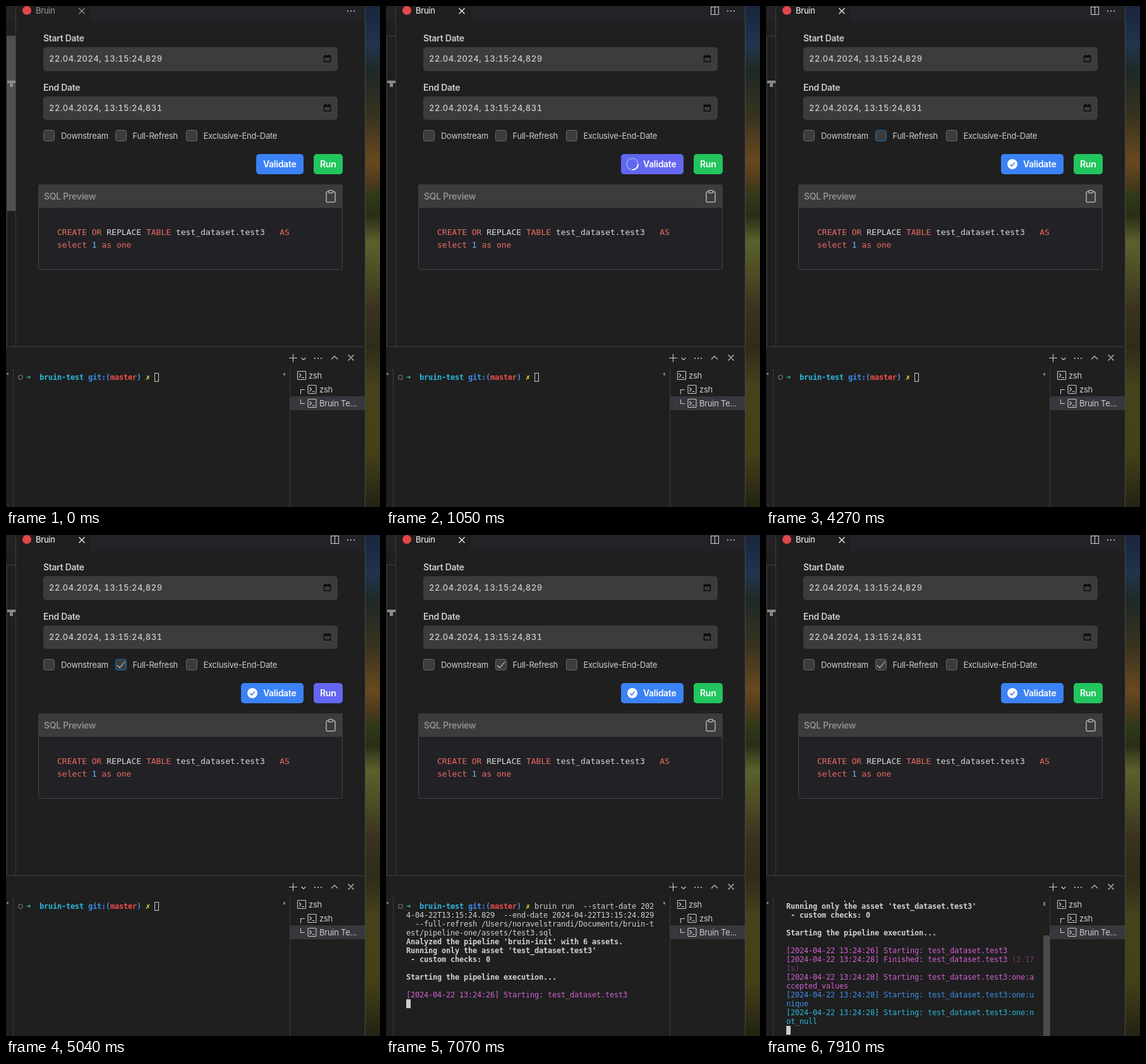
These frames come from a looping animation (592x792 px, 8000 ms). An HTML page:

```html
<!DOCTYPE html>
<html lang="en">
<head>
<meta charset="utf-8">
<title>Pipeline run</title>
<style>
  html, body { margin: 0; width: 100%; height: 100%; overflow: hidden; background: #1f1f1f; }
  svg { display: block; }
  text { white-space: pre; fill: #ccc; }
  .ui { font: 13px Inter, sans-serif; letter-spacing: -.02em; }
  .label { font: 600 14px Inter, sans-serif; letter-spacing: -.02em; }
  .date { font: 500 13px Inter, sans-serif; letter-spacing: .5px; font-feature-settings: "tnum"; }
  .sql { font: 13px "DejaVu Sans Mono", monospace; }
  .term text { font: 12px "DejaVu Sans Mono", monospace; letter-spacing: -.225px; }
  .term .bold { font-weight: 700; }
  .white { fill: #fff; }
  .red { fill: #ee6a60; }
  .icon { fill: none; stroke: #ccc; stroke-width: 1.1; }
  .line { fill: none; stroke: #3d3d3d; }
  .box { fill: #3c3c3c; stroke: #6b6b6b; }
</style>
</head>
<body>
<svg width="592" height="792" viewBox="0 0 592 792">
  <defs>
    <linearGradient id="hill" x2="0" y2="1">
      <stop offset="0" stop-color="#19263e"/>
      <stop offset=".08" stop-color="#22344c"/>
      <stop offset=".13" stop-color="#1e2926"/>
      <stop offset=".22" stop-color="#38331f"/>
      <stop offset=".31" stop-color="#68491f"/>
      <stop offset=".36" stop-color="#46381b"/>
      <stop offset=".38" stop-color="#2d3a19"/>
      <stop offset=".42" stop-color="#2b2d17"/>
      <stop offset=".47" stop-color="#5c602c"/>
      <stop offset=".54" stop-color="#4b4b24"/>
      <stop offset=".6" stop-color="#3b3320"/>
      <stop offset=".68" stop-color="#2f2b1a"/>
      <stop offset=".76" stop-color="#46421b"/>
      <stop offset=".89" stop-color="#444017"/>
      <stop offset="1" stop-color="#232214"/>
    </linearGradient>
    <clipPath id="screen"><rect y="578" width="448" height="214"/></clipPath>
    <g id="shell" class="icon">
      <rect x=".5" y=".5" width="13" height="13" rx="1"/>
      <path d="M3 4l3 3-3 3M7 10.5h4"/>
    </g>
    <g id="calendar"><path d="M1 2h10v9H1z" fill="none" stroke="#0b0b0b" stroke-width="1.4"/><path d="M1 1.5h10v3H1zM2.5 0h1.5v2H2.5zM8 0h1.5v2H8z" fill="#0b0b0b"/></g>
  </defs>

  <rect x="569" width="23" height="792" fill="url(#hill)"/>
  <path d="M568.5 0V792" stroke="#484848"/>

  <!-- editor tabs and left gutter -->
  <path d="M0 0H15V25H0zM134 0H568V25H134z" fill="#232327"/>
  <path class="line" d="M15.5 0V538M1.5 47V538M0 47.5H15M0 538.5H568"/>
  <rect id="scrollbar" x="1" y="47" width="14" height="277" fill="#4f4f4f"/>
  <path d="M2 118H15V122H11V128H6V122H2z" fill="#8a8a8a"/>
  <circle cx="33" cy="7" r="7" fill="#e2474b"/>
  <text id="tab" class="ui" x="47" y="12" font-style="italic">Bruin</text>
  <path id="close" class="icon" d="M115.500 3.500l9 9m0-9l-9 9"/>
  <path id="split" class="icon" d="M514.500 1.500h12v12h-12zM520.500 1.500v12"/>
  <g fill="#ccc"><circle cx="541" cy="8" r="1.100"/><circle cx="546" cy="8" r="1.100"/><circle cx="551" cy="8" r="1.100"/></g>

  <!-- form -->
  <text class="label" x="59" y="56">Start Date</text>
  <text class="label" x="59" y="134">End Date</text>
  <rect x="59" y="65" width="466" height="38" rx="5" fill="#3c3c3c"/>
  <rect x="59" y="143" width="466" height="37" rx="5" fill="#3c3c3c"/>
  <text class="date" x="68" y="88">22.04.2024, 13:15:24,829</text>
  <text class="date" x="68" y="166">22.04.2024, 13:15:24,831</text>
  <use href="#calendar" x="502.500" y="77"/>
  <use href="#calendar" x="502.500" y="155"/>
  <rect class="box" x="59.500" y="196.500" width="17" height="17" rx="3"/>
  <rect class="box" x="173.500" y="196.500" width="17" height="17" rx="3" id="refresh"/>
  <rect class="box" x="285.500" y="196.500" width="17" height="17" rx="3"/>
  <path id="tick" class="icon" d="M176 206l4 4 8.500-10"/>
  <text class="ui" x="87" y="210">Downstream</text>
  <text class="ui" x="200.500" y="210">Full-Refresh</text>
  <text class="ui" x="312.500" y="210">Exclusive-End-Date</text>

  <rect id="validate" y="234" height="32" rx="5"/>
  <g id="spinner" fill="none" stroke-width="2">
    <circle cx="390" cy="250" r="9" stroke="#79a9ee"/>
    <path d="M399 250a9 9 0 0 1-9 9" stroke="#fff"/>
  </g>
  <g id="done">
    <circle cx="390" cy="250" r="8" fill="#fff"/>
    <path d="M386.500 250.500l2.500 2.500 4.500-5.500" fill="none" stroke="#3b82f6" stroke-width="1.700"/>
  </g>
  <text class="label white" x="407" y="255">Validate</text>
  <rect id="run" x="487" y="234" width="46" height="32" rx="5"/>
  <text class="label white" x="497" y="255">Run</text>

  <!-- SQL card -->
  <rect x="51.500" y="282.500" width="481" height="134" rx="3" fill="#222226" stroke="#444"/>
  <path d="M51 319V285q0-3 3-3H530q3 0 3 3V319z" fill="#3c3c3c"/>
  <text class="label" x="60" y="306" style="fill:#8f8f8f">SQL Preview</text>
  <g class="icon" style="stroke:#b0b0b0;stroke-width:1.500"><rect x="507" y="293.500" width="14" height="16.500" rx="2"/><rect x="510.500" y="291.500" width="7" height="4" rx="1.500" fill="#3c3c3c"/></g>
  <text class="sql red" x="81" y="362">CREATE OR <tspan fill="#ddd">REPLACE</tspan> TABLE <tspan fill="#ddd">test_dataset.test3</tspan>   AS</text>
  <text class="sql red" x="81" y="382">select <tspan fill="#6cb6ff">1</tspan> as one</text>

  <!-- terminal panel -->
  <path class="icon" d="M448 556.500h13M454.500 550v13M467.500 556l3.500 3.500 3.500-3.500M515 558.500l5-5 5 5M541.500 551.500l9 9m0-9l-9 9"/>
  <g fill="#ccc"><circle cx="489" cy="557" r="1.100"/><circle cx="494" cy="557" r="1.100"/><circle cx="499" cy="557" r="1.100"/></g>
  <path class="line" d="M11.500 573V792M449.500 573V792"/>
  <rect x="450" y="617" width="118" height="22" fill="#37373d"/>
  <path class="icon" d="M473 606.500h-6.500v7M466.500 622v6.500h6.500"/>
  <use href="#shell" x="461" y="577"/>
  <use href="#shell" x="477.500" y="599"/>
  <use href="#shell" x="477.500" y="621"/>
  <text class="ui" x="479" y="589">zsh</text>
  <text class="ui" x="496" y="611">zsh</text>
  <text class="ui" x="496" y="633">Bruin Te...</text>
  <rect x="1" y="580" width="3" height="3" fill="#777"/>
  <rect id="mark" x="439" y="580" width="3" height="4" fill="#777"/>
  <rect id="slider" x="439" y="633" width="10" height="159" fill="#4b4b4b"/>
  <g clip-path="url(#screen)">
    <g id="term" class="term">
      <rect id="select1" x="277" y="580" height="14" fill="#264f78"/>
      <rect id="select2" x="32" y="594" height="14" fill="#264f78"/>
      <circle cx="23" cy="587" r="3.300" fill="none" stroke="#6b6b6b" stroke-width="1.300"/>
      <rect id="cursor" x="32.500" width="6" height="13" stroke="#ccc"/>
    </g>
  </g>
</svg>
<script>
const $ = id => document.getElementById(id);
const set = (id, attrs) => { for (const k in attrs) $(id).setAttribute(k, attrs[k]); };
const show = (id, on) => set(id, { visibility: on ? 'visible' : 'hidden' });

const LOOP = 8000, CELL = 7, ROW = 14;
const BLUE = '#3b82f6', INDIGO = '#6366f1', GREEN = '#22c55e';
const white = '#d0d0d0', pink = '#d161d1', sky = '#3b8eea', cyan = '#29b8db';

// time shown, row, column, text, colour, bold
const output = [
  [0, 0, 0, '➜', '#23d18b', 1],
  [0, 0, 3, 'bruin-test', cyan, 1],
  [0, 0, 14, 'git:(', sky, 1],
  [0, 0, 19, 'master', '#f14c4c', 1],
  [0, 0, 25, ')', sky, 1],
  [0, 0, 27, '✗', '#f5f543', 1],
  [5460, 0, 29, 'bruin run  --start-date 202', white],
  [5460, 1, 0, '4-04-22T13:15:24.829  --end-date 2024-04-22T13:15:24.829', white],
  [5460, 2, 0, '  --full-refresh /Users/noravelstrandi/Documents/bruin-t', white],
  [5460, 3, 0, 'est/pipeline-one/assets/test3.sql', white],
  [5530, 4, 0, "Analyzed the pipeline 'bruin-init' with 6 assets.", white, 1],
  [5530, 5, 0, "Running only the asset 'test_dataset.test3'", white, 1],
  [5530, 6, 0, ' - custom checks: 0', white, 1],
  [5530, 8, 0, 'Starting the pipeline execution...', white, 1],
  [5600, 10, 0, '[2024-04-22 13:24:26] Starting: test_dataset.test3', pink],
  [7840, 11, 0, '[2024-04-22 13:24:28] Finished: test_dataset.test3', pink],
  [7840, 11, 51, '(2.17', '#733773'],
  [7840, 12, 0, '1s)', '#733773'],
  [7840, 13, 0, '[2024-04-22 13:24:28] Starting: test_dataset.test3:one:a', pink],
  [7840, 14, 0, 'ccepted_values', pink],
  [7840, 15, 0, '[2024-04-22 13:24:28] Starting: test_dataset.test3:one:u', sky],
  [7840, 16, 0, 'nique', sky],
  [7840, 17, 0, '[2024-04-22 13:24:28] Starting: test_dataset.test3:one:n', cyan],
  [7840, 18, 0, 'ot_null', cyan],
].map(([time, row, col, text, colour, bold]) => {
  const node = document.createElementNS('http://www.w3.org/2000/svg', 'text');
  node.setAttribute('x', 32 + col * CELL);
  node.setAttribute('y', 591 + row * ROW);
  node.style.fill = colour;
  if (bold) node.classList.add('bold');
  node.textContent = text;
  $('term').append(node);
  return { time, node };
});

function drawEditor(t) {
  const focused = t >= 630, wide = t >= 700, valid = t >= 1470;
  const fade = Math.min(4, Math.max(0, Math.floor(t / 70)));
  set('scrollbar', { opacity: t >= 490 ? 0 : 1 - fade * .18 });
  $('tab').style.fill = focused ? '#fff' : '#9d9d9d';
  $('close').style.stroke = focused ? '#fff' : '#9d9d9d';
  show('split', focused);

  const overValidate = t >= 210 && t < 2450 || t >= 4760 && t < 4970;
  const overRun = t >= 2450 && t < 3220 || t >= 5040 && t < 5600;
  set('validate', { x: wide ? 372 : 396, width: wide ? 99 : 75, fill: overValidate ? INDIGO : BLUE });
  set('run', { fill: overRun ? INDIGO : GREEN });
  show('spinner', wide && !valid);
  show('done', valid);
  set('spinner', { transform: `rotate(${(t - 1050) * .36} 390 250)` });

  $('refresh').style.stroke = t >= 4270 && t < 5320 ? '#0078d4' : '';
  show('tick', t >= 4340);
}

function drawTerminal(t) {
  const scrolled = t >= 7840;
  output.forEach(line => line.node.setAttribute('visibility', t >= line.time ? 'visible' : 'hidden'));
  set('term', { transform: `translate(0 ${scrolled ? -5 * ROW : 0})` });
  show('slider', scrolled);
  set('mark', { height: scrolled ? 6 : 4 });

  const row = scrolled ? 19 : t >= 5600 ? 11 : t >= 5530 ? 10 : t >= 5460 ? 4 : 0;
  set('cursor', {
    x: row ? 32.5 : 32.5 + 29 * CELL,
    y: 580.5 + row * ROW,
    fill: t >= 7070 ? '#ccc' : 'none',
  });

  // the selection is dragged to the right and down one row
  const drag = Math.min(5, Math.max(0, Math.floor((t - 7070) / 70))) / 5;
  const col = 35 + Math.round(12 * drag), second = drag > .5;
  set('select1', { width: ((second ? 56 : col) - 35) * CELL });
  set('select2', { width: second ? col * CELL : 0 });
}

function frame() {
  const t = performance.now() % LOOP;
  drawEditor(t);
  drawTerminal(t);
  requestAnimationFrame(frame);
}
frame();
</script>
</body>
</html>
```
